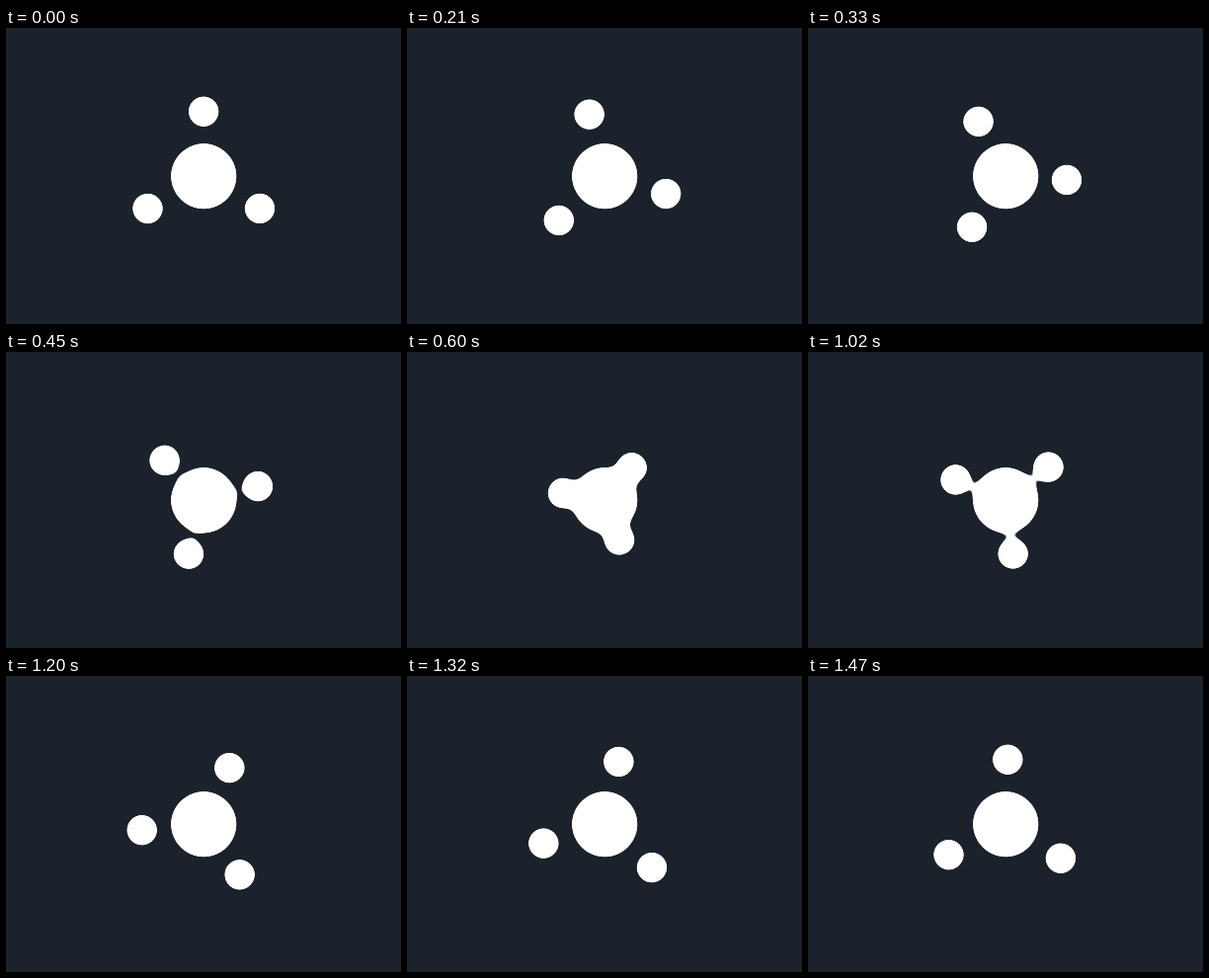
Recreate the animation shown at these times as an HTML page. Size 400x300 px, loop 1500 ms.

```html
<!DOCTYPE html>
<html lang="en">
<head>
<meta charset="utf-8">
<title>Gooey orbit</title>
<style>
  html, body {
    margin: 0;
    width: 100%;
    height: 100%;
    overflow: hidden;
    background: #1c222b;
  }
  svg {
    display: block;
    width: 400px;
    height: 300px;
    fill: #fff;
  }
  .spin { animation: spin 1500ms infinite; }
  .ball { animation: dive 1500ms infinite; }

  /* Both motions speed up towards the middle of the loop and slow down after it. */
  @keyframes spin {
    0% {
      transform: rotate(0deg);
      animation-timing-function: cubic-bezier(.29, .06, .93, .228);
    }
    50% {
      transform: rotate(-180deg);
      animation-timing-function: cubic-bezier(.095, .77, .71, .925);
    }
    100% { transform: rotate(-360deg); }
  }
  @keyframes dive {
    0% {
      transform: translateY(-65.6px);
      animation-timing-function: cubic-bezier(.33, 0, .895, 0);
    }
    50% {
      transform: translateY(0);
      animation-timing-function: cubic-bezier(.105, 1, .67, 1);
    }
    100% { transform: translateY(-65.6px); }
  }
</style>
</head>
<body>
<svg viewBox="0 0 400 300">
  <defs>
    <filter id="goo" filterUnits="userSpaceOnUse" x="0" y="0" width="400" height="300"
            color-interpolation-filters="sRGB">
      <feGaussianBlur stdDeviation="5.4"/>
      <feColorMatrix values="0 0 0 0 1  0 0 0 0 1  0 0 0 0 1  0 0 0 20 -9.5"/>
    </filter>
  </defs>
  <g filter="url(#goo)">
    <g transform="translate(200.2 150.2)">
      <circle r="33.6"/>
      <g class="spin">
        <g><circle class="ball" r="16.1"/></g>
        <g transform="rotate(120)"><circle class="ball" r="16.1"/></g>
        <g transform="rotate(240)"><circle class="ball" r="16.1"/></g>
      </g>
    </g>
  </g>
</svg>
</body>
</html>
```
